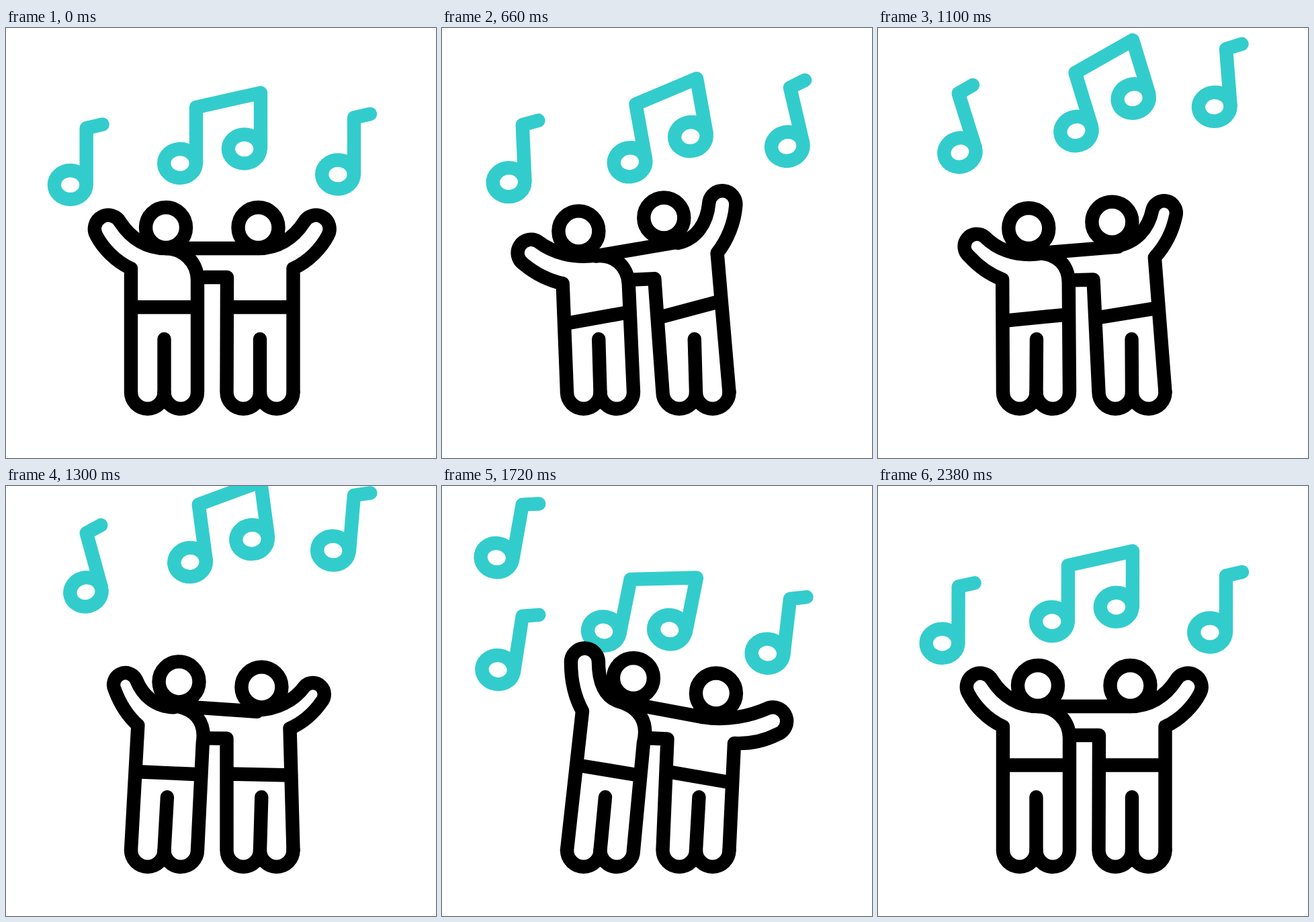
Animation of 640x640 px, one loop 2400 ms. Source, as an HTML page:

```html
<!DOCTYPE html>
<html lang="en">
<head>
<meta charset="utf-8">
<title>Singing friends</title>
<style>
  html, body { margin: 0; width: 100%; height: 100%; overflow: hidden; background: #fff; }
  svg { display: block; width: 100%; height: 100%; }
  g { fill: none; stroke-width: 20.4; stroke-linecap: round; stroke-linejoin: round; }
  #notes { stroke: #33cccc; }
  #people { stroke: #000; }
</style>
</head>
<body>
<svg viewBox="0 0 640 640">
  <defs>
    <!-- both notes hang from a pivot at 0,0 -->
    <g id="single">
      <path d="M24 -5.5L0 0V84"/>
      <ellipse cx="-24" cy="84.5" rx="23.8" ry="21.5"/>
    </g>
    <g id="double">
      <path d="M-96 105V21.5L0 0V83"/>
      <ellipse cx="-120" cy="105" rx="23.8" ry="21.5"/>
      <ellipse cx="-24.3" cy="83.5" rx="23.8" ry="21.5"/>
    </g>
  </defs>
  <g id="notes"></g>
  <g id="people"></g>
</svg>
<script>
const LOOP = 2400;
const NS = 'http://www.w3.org/2000/svg';

const add = (parent, tag, attrs = {}) => {
  const el = document.createElementNS(NS, tag);
  for (const key in attrs) el.setAttribute(key, attrs[key]);
  return document.getElementById(parent).appendChild(el);
};

// Eased progress of t between a and b.
const ease = (t, a, b) => {
  const x = Math.min(1, Math.max(0, (t - a) / (b - a)));
  return x * x * (3 - 2 * x);
};

// keys: start, furthest left, furthest right, upright again.
// reach: weights of the left and right poses at the two extremes.
const body = { keys: [200, 810, 1620, 2200], reach: [[1.02, -0.02], [0, 1.085]] };
const arm = { keys: [200, 850, 1665, 2200], reach: [[1, 0], [0, 1.03]] };

function lean({ keys: [a, b, c, d], reach: [left, right] }, t) {
  const wl = ease(t, a, b) * (1 - ease(t, b, c));
  const wr = ease(t, b, c) * (1 - ease(t, c, d));
  return [0, 1].map(i => left[i] * wl + right[i] * wr);
}

// Each shape: upright, leaning left, leaning right, plus a fixed tail.
const ring = 'a30 30 0 1 0 60 0a30 30 0 1 0 -60 0';
const feet = x => `M${x} 542a24.7 24.7 0 0 0 49.5 0a24.7 24.7 0 0 0 49.5 0`;

const shapes = [
  // right friend: trunk, raised arm and side, belt and legs, head
  {
    move: body,
    poses: [
      'M328.5 542L329 371L285 371M238 328L375.5 328',
      'M328.5 542L314.5 373.5L277 375.5M228 341L345 318',
      'M328.5 542L335.5 376.5L302 375M265 321L388 344'
    ],
    tail: feet(328.5)
  },
  {
    move: arm,
    poses: [
      'M375.5 328C403.5 328 427.5 314 443.5 289A1 1 0 0 1 479 309C469.5 327 451.5 347 427.5 358L427.5 542',
      'M345 318C372 311 386 285 385.5 252.5A1 1 0 0 1 426.5 253.5C426.5 280 418 308 405 329L427.5 542',
      'M388 344C425 350 460 342 485.5 330.5A1 1 0 0 1 499.5 369.5C479 380 457 384 435 383L427.5 542'
    ]
  },
  {
    move: body,
    poses: [
      'M331 415.5L425.5 415.5M378 463L378 542',
      'M322 433.5L411.5 406M375.5 463L378 542',
      'M335 425L430.5 441.5M382.5 463L378 542'
    ]
  },
  { move: body, poses: ['M345.5 297', 'M294 280.5', 'M378 308.5'], tail: ring },
  // left friend
  {
    move: body,
    poses: [
      'M285 542L285 375C285 349 264 328 238 328',
      'M285 542L277 382C275 354 255 338 228 341',
      'M285 542L300 382C308 350 293 330 265 321'
    ],
    tail: feet(186)
  },
  {
    move: arm,
    poses: [
      'M238 328C210 328 186 314 170 289A1 1 0 0 0 134.5 309C144 327 162 347 186 358L186 542',
      'M228 341C192 347 160 340 136.5 325.5A1 1 0 0 0 118.5 362.5C138 376 158 383 178 386L186 542',
      'M265 321C242 315 233 292 233 261A1 1 0 0 0 192 263C192 290 198 315 209 335L186 542'
    ]
  },
  {
    move: body,
    poses: [
      'M188 415.5L283 415.5M235.5 463L235.5 542',
      'M184.5 443.5L277 424.5M233 463L235.5 542',
      'M201.5 415.5L293 430.5M243 463L235.5 542'
    ]
  },
  { move: body, poses: ['M208 297', 'M169 303', 'M255 286'], tail: ring }
];

for (const s of shapes) {
  s.el = add('people', 'path');
  s.nums = s.poses.map(p => p.match(/-?[\d.]+/g).map(Number));
}

function drawShape({ el, move, poses, nums: [mid, left, right], tail = '' }, t) {
  const [l, r] = lean(move, t);
  let i = 0;
  const d = poses[0].replace(/-?[\d.]+/g, () => {
    const v = mid[i] + (left[i] - mid[i]) * l + (right[i] - mid[i]) * r;
    i++;
    return Math.round(v * 100) / 100;
  });
  el.setAttribute('d', d + tail);
}

// out: rise begins and ends; swing: turn halfway and at the end of the rise.
// back: fresh note begins and ends its way up; turn, drop: where it begins.
const RISE = 125;
const notes = [
  { id: 'single', x: 119.7, y: 149, out: [500, 1860], swing: [-18, 13.5], back: [1680, 2440], turn: 8.8, drop: 45 },
  { id: 'double', x: 379, y: 96.5, out: [304, 1664], swing: [-19, 6.3], back: [1540, 2420], turn: 12.7, drop: 45 },
  { id: 'single', x: 518, y: 133.5, out: [110, 1470], swing: [-14.5, 8.4], back: [1430, 2290], turn: 9, drop: 47 }
];

for (const n of notes) {
  n.old = add('notes', 'use', { href: '#' + n.id });
  n.fresh = add('notes', 'use', { href: '#' + n.id });
}

function place(el, shown, x, y, angle) {
  el.setAttribute('visibility', shown ? 'visible' : 'hidden');
  el.setAttribute('transform', `translate(${x} ${y}) rotate(${angle})`);
}

function drawNote(n, t) {
  const [a, b] = n.out;
  const half = (a + b) / 2;
  const [s1, s2] = n.swing;
  const angle = s1 * ease(t, a, half) + (s2 - s1) * ease(t, half, b);
  place(n.old, t < b, n.x, n.y - RISE * ease(t, a, b), angle);

  const rest = 1 - ease(t, ...n.back);
  place(n.fresh, t >= n.back[0], n.x, n.y + n.drop * rest, n.turn * rest);
}

function draw(now) {
  const t = now % LOOP;
  for (const s of shapes) drawShape(s, t);
  for (const n of notes) drawNote(n, t);
}

function tick(now) {
  draw(now);
  requestAnimationFrame(tick);
}
draw(0);
requestAnimationFrame(tick);
</script>
</body>
</html>
```
